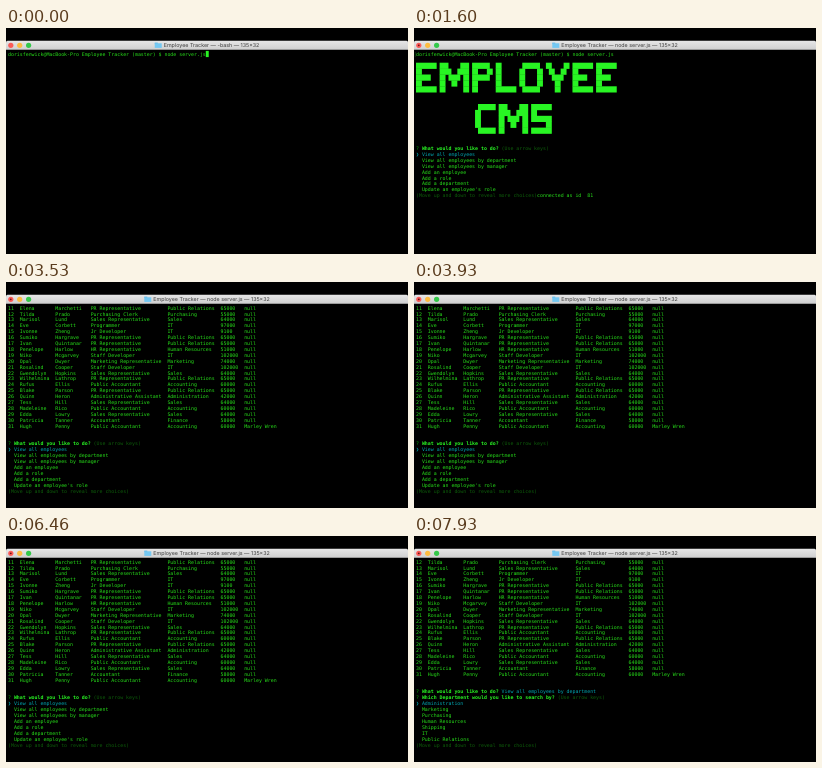
Write an HTML page with a canvas that moves like this. It is 402 by 226 pixels and loops after 8000 ms.

```html
<!DOCTYPE html>
<html lang="en">
<head>
<meta charset="utf-8">
<title>Employee Tracker</title>
<style>
  html, body { margin: 0; width: 100%; height: 100%; overflow: hidden; background: #000; }
  canvas { display: block; }
</style>
</head>
<body>
<canvas id="stage" width="402" height="226"></canvas>
<script>
const ctx = document.getElementById('stage').getContext('2d');
const LOOP = 8000;
const CELL_W = 2.952, CELL_H = 5.9, LEFT = 2, TOP = 22.9;
const GREEN = '#27e01a', BRIGHT = '#28f523', DIM = '#0d5c0a', CYAN = '#00a6b2';

// Block letters, five rows each
const GLYPHS = {
  E: ['#######', '##', '#####', '##', '#######'],
  M: ['###    ###', '####  ####', '## #### ##', '##  ##  ##', '##      ##'],
  P: ['###### ', '##   ##', '######', '##', '##'],
  L: ['##', '##', '##', '##', '#######'],
  O: [' ###### ', '##    ##', '##    ##', '##    ##', ' ######'],
  Y: ['##    ##', ' ##  ##', '  ####', '   ##', '   ##'],
  C: [' ######', '##', '##', '##', ' ######'],
  S: ['#######', '##', '#######', '     ##', '#######']
};

const JOBS = {
  pr: ['PR Representative', 'Public Relations', 65000],
  clerk: ['Purchasing Clerk', 'Purchasing', 55000],
  sales: ['Sales Representative', 'Sales', 64000],
  prog: ['Programmer', 'IT', 97000],
  jr: ['Jr Developer', 'IT', 9100],
  hr: ['HR Representative', 'Human Resources', 51000],
  dev: ['Staff Developer', 'IT', 102000],
  mkt: ['Marketing Representative', 'Marketing', 74000],
  pub: ['Public Accountant', 'Accounting', 60000],
  admin: ['Administrative Assistant', 'Administration', 42000],
  acct: ['Accountant', 'Finance', 58000]
};

const STAFF = `Elena Marchetti pr
Tilda Prado clerk
Marisol Lund sales
Eve Corbett prog
Ivonne Zheng jr
Sumiko Hargrave pr
Ivan Quintanar pr
Penelope Harlow hr
Niko Mcgarvey dev
Opal Dwyer mkt
Rosalind Cooper dev
Gwendolyn Hopkins sales
Wilhelmina Lathrop pr
Rufus Ellis pub
Blake Parson pr
Quinn Heron admin
Tess Hill sales
Madeleine Rico pub
Edda Lowry sales
Patricia Tanner acct
Hugh Penny pub`.split('\n').map((line, i, all) => {
  const [first, last, job] = line.split(' ');
  return [11 + i, first, last, ...JOBS[job], i === all.length - 1 ? 'Marley Wren' : 'null'];
});
const COLUMNS = [0, 4, 16, 28, 54, 72, 80];

const ACTIONS = ['View all employees', 'View all employees by department', 'View all employees by manager',
  'Add an employee', 'Add a role', 'Add a department', "Update an employee's role"];
const DEPARTMENTS = ['Administration', 'Marketing', 'Purchasing', 'Human Resources', 'Shipping', 'IT', 'Public Relations'];
const QUESTION = 'What would you like to do?';
const COMMAND = 'dorisfenwick@MacBook-Pro Employee Tracker (master) $ node server.js';

// Writes text on the terminal grid and returns the next free column
function put(row, col, text, color = GREEN, bold = false) {
  ctx.font = `${bold ? 'bold ' : ''}4.92px "DejaVu Sans Mono", monospace`;
  ctx.fillStyle = color;
  for (const ch of String(text)) {
    if (ch !== ' ') ctx.fillText(ch, LEFT + col * CELL_W, TOP + row * CELL_H + 4.7);
    col++;
  }
  return col;
}

// The slight extra height closes the seams between stacked cells
function fillCells(row, col, count) {
  ctx.fillStyle = BRIGHT;
  ctx.fillRect(LEFT + col * CELL_W, TOP + row * CELL_H, count * CELL_W, CELL_H + 0.3);
}

function banner(word, row, col) {
  for (const letter of word) {
    const glyph = GLYPHS[letter];
    glyph.forEach((line, y) => {
      for (const run of line.matchAll(/#+/g)) fillCells(row + y, col + run.index, run[0].length);
    });
    col += Math.max(...glyph.map(line => line.length)) + 1;
  }
}

function ask(row, question, answer, color) {
  put(row, 0, '?', '#00a600');
  const col = put(row, 2, question, BRIGHT, true);
  put(row, col + 1, answer, color);
}

function menu(row, question, choices, selected, showHint = true) {
  ask(row, question, showHint ? '(Use arrow keys)' : '', DIM);
  choices.forEach((choice, i) => {
    const active = i === selected;
    if (active) put(row + 1 + i, 0, '❯', CYAN);
    put(row + 1 + i, 2, choice, active ? CYAN : GREEN);
  });
  return put(row + 8, 0, '(Move up and down to reveal more choices)', DIM);
}

function table(firstIndex) {
  STAFF.slice(firstIndex).forEach((person, row) =>
    person.forEach((value, i) => put(row, COLUMNS[i], value)));
}

function dot(x, radius, color) {
  ctx.fillStyle = color;
  ctx.beginPath();
  ctx.arc(x, 17.3, radius, 0, Math.PI * 2);
  ctx.fill();
}

function titleBar(running) {
  const shade = ctx.createLinearGradient(0, 13, 0, 22);
  shade.addColorStop(0, '#e6e6e6');
  shade.addColorStop(1, '#cecece');
  ctx.fillStyle = shade;
  ctx.beginPath();
  ctx.roundRect(0, 12.8, 402, 9, [1.5, 1.5, 0, 0]);
  ctx.fill();
  ['#fc5b57', '#fdbc40', '#34c84a'].forEach((color, i) => dot(4.8 + i * 8.9, 2.6, color));
  if (running) dot(4.8, 0.9, '#6b1210');

  const title = `Employee Tracker — ${running ? 'node server.js' : '-bash'} — 135×32`;
  ctx.font = '5.35px Inter, sans-serif';
  const x = 201 - (ctx.measureText(title).width + 9) / 2;
  ctx.fillStyle = '#5fb9ea';
  ctx.fillRect(x, 14.6, 3, 1.5);
  ctx.fillStyle = '#74c8f2';
  ctx.fillRect(x, 15.3, 7, 4.6);
  ctx.fillStyle = '#3c3c3c';
  ctx.fillText(title, x + 9, 19.3);
}

function draw(t) {
  ctx.fillStyle = '#000';
  ctx.fillRect(0, 0, 402, 226);
  ctx.textRendering = 'geometricPrecision';
  titleBar(t >= 1400);

  if (t < 3460) {
    put(0, 0, COMMAND);
    if (t >= 1330) put(0, -0.8, '[', DIM);
  }
  if (t < 1330) {
    if (t < 330 || t >= 800) fillCells(0, COMMAND.length, 1);
  } else if (t < 1600) {
    fillCells(1, 0, 1);
  } else if (t < 3460) {
    banner('EMPLOYEE', 2, 0);
    banner('CMS', 9, 20);
    const col = menu(16, QUESTION, ACTIONS, 0);
    put(24, col, 'connected as id  81');
  } else if (t < 7260) {
    table(0);
    const moved = t >= 6600;
    menu(23, QUESTION, ACTIONS, moved ? 1 : 0, !moved);
  } else {
    table(1);
    ask(22, QUESTION, ACTIONS[1], CYAN);
    menu(23, 'Which Department would you like to search by?', DEPARTMENTS, 0);
  }
}

function tick() {
  draw(performance.now() % LOOP);
  requestAnimationFrame(tick);
}
tick();
</script>
</body>
</html>
```
